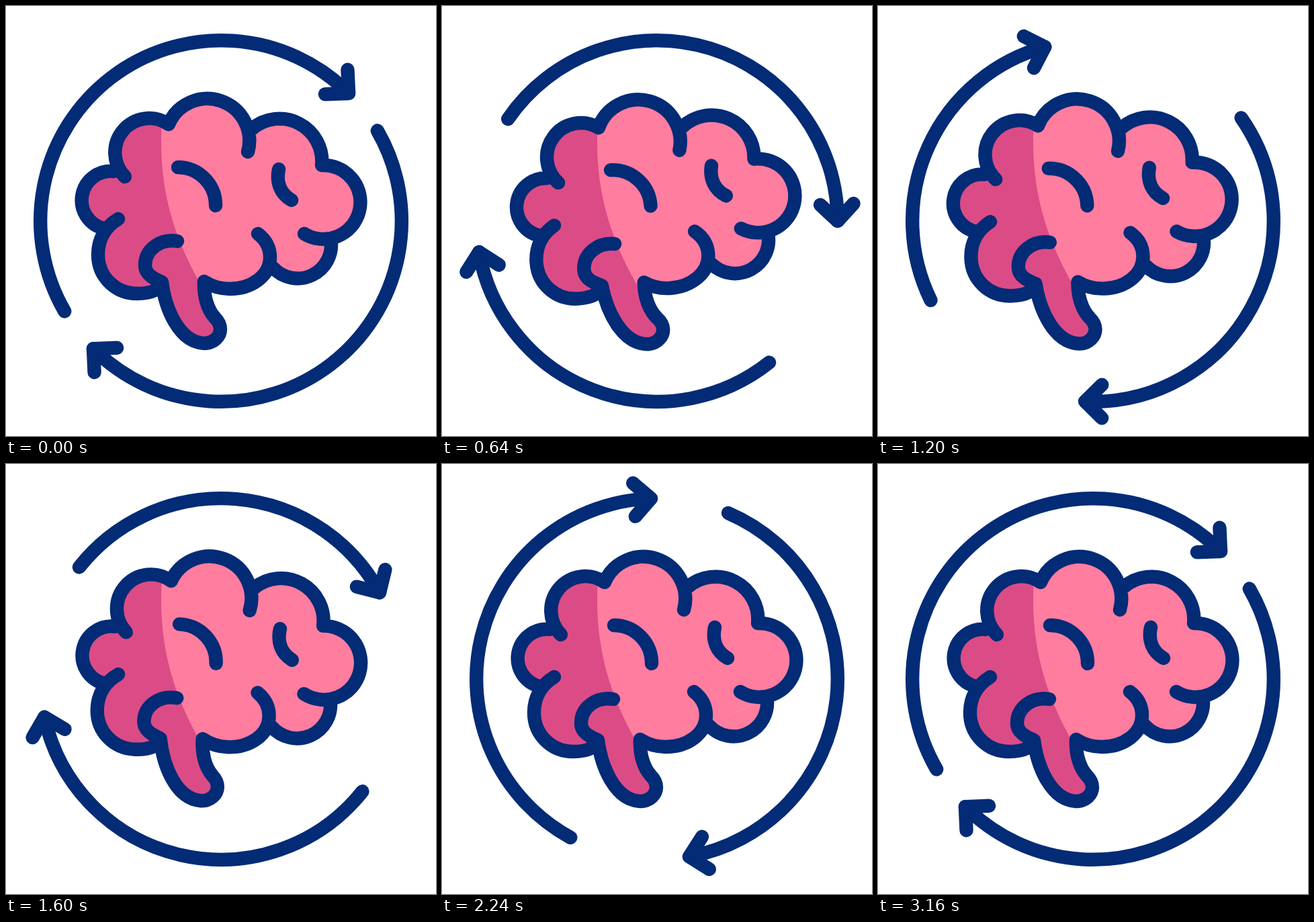
Animation of 640 by 640 pixels, one loop 3360 ms. Source, as an HTML page:

```html
<!DOCTYPE html>
<html lang="en">
<head>
<meta charset="utf-8">
<title>Brain cycle</title>
<style>
  html, body { margin: 0; height: 100%; overflow: hidden; background: #fff; }
  svg { display: block; width: 100vw; height: 100vh; }
  .line { fill: none; stroke: #032b76; stroke-width: 20.4; stroke-linecap: round; stroke-linejoin: round; }
</style>
</head>
<body>
<svg viewBox="0 0 640 640">
  <defs>
    <path id="lobes" d="M177 254A51 51 0 0 1 242 176A62.6 62.6 0 0 1 360 217
      M366 183A63.2 63.2 0 0 1 470 237A55 55 0 1 1 444 339
      M483.5 348A50 50 0 0 1 397 389
      M375 339C388 349 393 362 393 374C393 402 365 421 333 421C319 421 306 417 295 410
      C294 432 300 452 311 464C315 468 319 474 319 481C319 492 309 502 295 502
      C257 500 237 450 232 411C221 406 207 400 207 386C207 362 230 346 255 350
      M222 423C214 427 205 428 195 428C163 428 137 403 137 370C137 348 147 329 167 317
      M145 331A43.3 43.3 0 0 1 160 246"/>
    <clipPath id="inside">
      <path d="M160 246L177 254L242 176L360 217L366 183L470 237L444 339L483 348L397 389L295 410L255 350L222 423L167 317L145 331Z"/>
      <use href="#lobes"/>
    </clipPath>
  </defs>
  <g id="brain">
    <g clip-path="url(#inside)">
      <rect width="640" height="640" fill="#ff7d9f"/>
      <path id="shade" fill="#db4c86" d="M232 100V170C226 265 246 345 302 435L340 500V640H0V100Z"/>
    </g>
    <use href="#lobes" class="line"/>
    <path class="line" d="M256 240A56.5 56.5 0 0 1 312 297M406 243C402 262 408 279 425 289"/>
  </g>
  <path id="arcA" class="line"/>
  <path id="headA" class="line" d="M612.5 294L588.8 320L563 296"/>
  <path id="arcB" class="line"/>
  <path id="headB" class="line" d="M612.5 294L588.8 320L563 296"/>
</svg>
<script>
const LOOP = 3360, STEP = 40, END = 3160, R = 268.8;

// Each end of an arrow makes one full turn with its own easing
const arrows = [
  { id: "A", time: 3000, tail: 150, head: 315, tailEase: bezier(.27, .485), headEase: bezier(.333, .6) },
  { id: "B", time: 3080, tail: -30, head: 135, tailEase: bezier(.176, .51), headEase: bezier(.391, .588) }
];

// The brain tips one way, swings back past the middle and settles
const swings = [{ at: 0, angle: 0 }, { at: 800, angle: -4 }, { at: 1680, angle: 1.6 }, { at: 2240, angle: 0 }];

// Same curve as CSS cubic-bezier(x1, 0, x2, 1)
function bezier(x1, x2) {
  return x => {
    let low = 0, high = 1, s;
    for (let i = 0; i < 24; i++) {
      s = (low + high) / 2;
      const w = 1 - s;
      if (3 * x1 * s * w * w + 3 * x2 * s * s * w + s ** 3 < x) low = s;
      else high = s;
    }
    return s * s * (3 - 2 * s);
  };
}

function tilt(t) {
  const i = swings.findIndex(swing => swing.at > t);
  if (i < 0) return 0;
  const a = swings[i - 1], b = swings[i];
  const u = (t - a.at) / (b.at - a.at);
  return a.angle + (b.angle - a.angle) * (1 - Math.cos(Math.PI * u)) / 2;
}

const el = id => document.getElementById(id);
const turn = (id, angle) => el(id).setAttribute("transform", `rotate(${angle} 320 320)`);

// Angles in degrees, clockwise from the right
function point(deg) {
  const a = deg * Math.PI / 180;
  return `${320 + R * Math.cos(a)} ${320 + R * Math.sin(a)}`;
}

function draw(now) {
  const t = Math.min(Math.floor(now % LOOP / STEP) * STEP, END);
  const angle = tilt(t);
  turn("brain", angle);
  turn("shade", -angle); // the shadow edge stays upright
  for (const { id, time, tail, head, tailEase, headEase } of arrows) {
    const x = Math.min(t / time, 1);
    const from = tail + 360 * tailEase(x), to = head + 360 * headEase(x);
    el("arc" + id).setAttribute("d", `M${point(from)}A${R} ${R} 0 0 1 ${point(to)}`);
    turn("head" + id, to);
  }
  requestAnimationFrame(draw);
}
draw(0);
</script>
</body>
</html>
```
